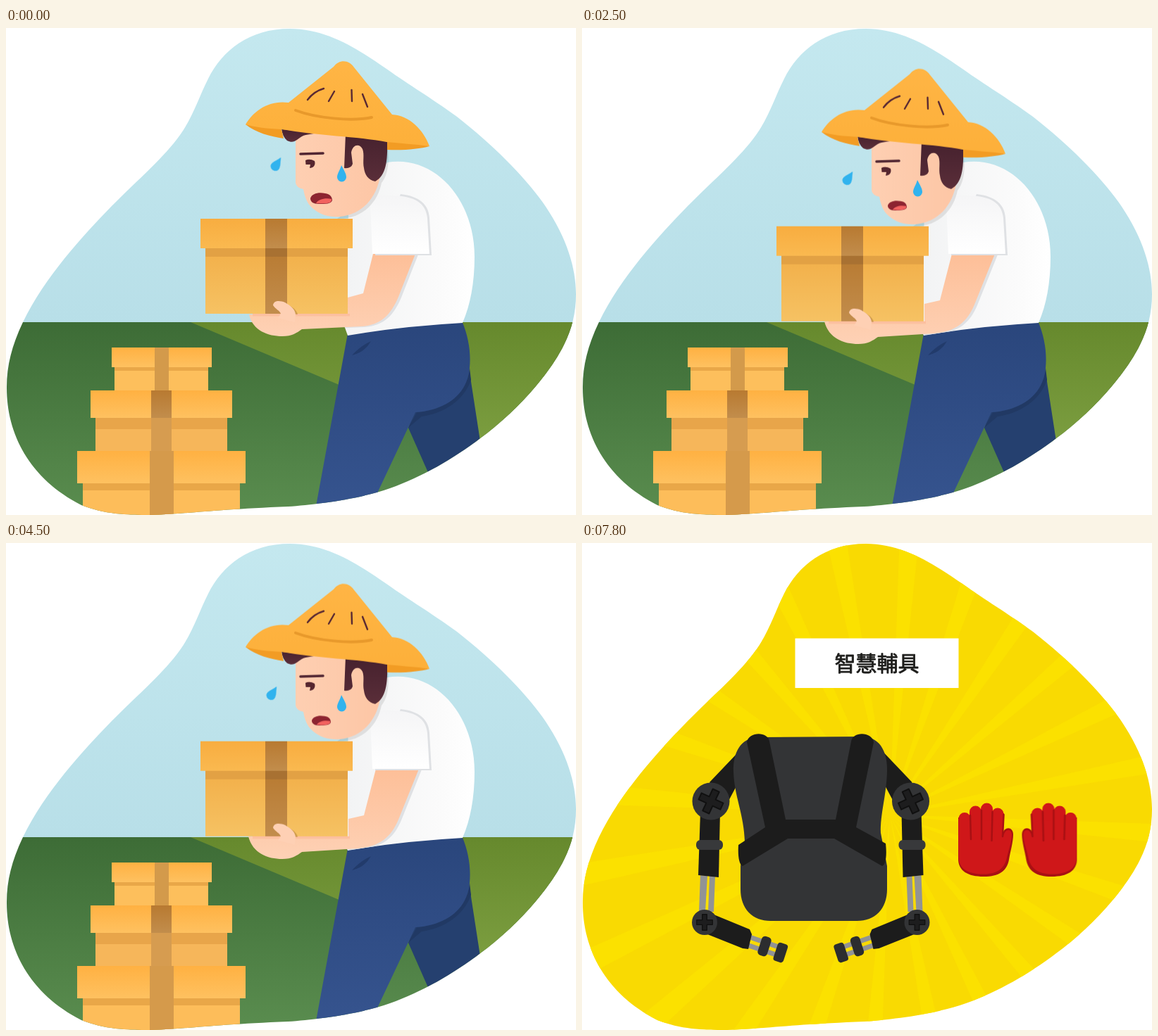
These frames come from a looping animation (809 by 692 pixels, 8000 ms). An HTML page:

```html
<!DOCTYPE html>
<html lang="zh-Hant">
<head>
<meta charset="utf-8">
<title>Smart aids</title>
<style>
html, body { margin: 0; width: 100%; height: 100%; overflow: hidden; background: #fff; }
svg { display: block; width: 100vw; height: 100vh; }

.work { animation: work 8s step-end infinite; }
.gear { animation: gear 8s step-end infinite; }
@keyframes work { 0% { visibility: visible; } 62.5%, 100% { visibility: hidden; } }
@keyframes gear { 0% { visibility: hidden; } 62.5%, 100% { visibility: visible; } }

/* lifting: up for half a second, down for half a second */
.sink, .fly, .drip, .mouth { animation: sink 1s step-end infinite; }
.fly { animation-name: fly; }
.drip { animation-name: drip; }
.mouth { animation-name: mouth; transform-origin: 447.5px 242.5px; }
.up { animation: up 1s step-end infinite; }
.down { animation: down 1s step-end infinite; }
@keyframes sink { 50%, 100% { transform: translateY(10.7px); } }
@keyframes fly { 50%, 100% { transform: translate(-6px, 20px); } }
@keyframes drip { 50%, 100% { transform: translateY(21px); } }
@keyframes mouth { 50%, 100% { transform: translateY(10.2px) scale(.87); } }
@keyframes up { 0% { opacity: 1; } 50%, 100% { opacity: 0; } }
@keyframes down { 0% { opacity: 0; } 50%, 100% { opacity: 1; } }

.rays { transform-origin: 437px 386px; animation: rays .4s -.2s step-end infinite; }
@keyframes rays { 0% { transform: rotate(2deg); } 50%, 100% { transform: rotate(9.5deg); } }

.label {
  font: 500 30px "Noto Sans CJK TC", "Noto Sans CJK", "Noto Sans CJK JP", sans-serif;
  text-anchor: middle; fill: #1d1d1b; stroke: #1d1d1b; stroke-width: .8; stroke-linejoin: round;
}
</style>
</head>
<body>
<svg viewBox="0 0 809 692" preserveAspectRatio="none">
<defs>
  <clipPath id="blob"><path d="M403 1C345 1 307 32 287 72C272 102 266 125 247 152C224 184 190 213 150 253C110 294 55 354 24 418C8 452 1 480 1 511C1 577 33 640 107 678C140 691 170 692 206 692C260 690 300 684 400 680C440 677 500 670 545 654C590 638 635 612 673 583C720 549 770 495 792 450C803 428 809 405 809 378C809 340 795 295 762 248C735 210 690 165 640 126C600 97 575 83 540 58C500 30 455 1 403 1Z"/></clipPath>
  <path id="torso" d="M541 191C610 180 665 245 665 325C665 362 659 394 648 419Q560 424 485 437L480 423L486 265L520 215Z"/>
  <clipPath id="onShirt"><use href="#torso"/></clipPath>
  <linearGradient id="sky" x2="0" y2="1"><stop stop-color="#c4e8ef"/><stop offset="1" stop-color="#b8dfe8"/></linearGradient>
  <linearGradient id="turf" x2="0" y2="1"><stop stop-color="#3d6c36"/><stop offset="1" stop-color="#5a8d4f"/></linearGradient>
  <linearGradient id="lawn" x2="0" y2="1"><stop stop-color="#66892d"/><stop offset="1" stop-color="#83a546"/></linearGradient>
  <linearGradient id="lid" x2="0" y2="1"><stop stop-color="#ffb142"/><stop offset="1" stop-color="#fec160"/></linearGradient>
  <linearGradient id="boxLid" x2="0" y2="1"><stop stop-color="#f8ad40"/><stop offset="1" stop-color="#fab950"/></linearGradient>
  <linearGradient id="boxBody" x2="0" y2="1"><stop stop-color="#f2af49"/><stop offset="1" stop-color="#f6c263"/></linearGradient>
  <linearGradient id="tape" x2="0" y2="1"><stop stop-color="#b87a31"/><stop offset="1" stop-color="#c28d4c"/></linearGradient>
  <linearGradient id="skin" x2="1" y2="0"><stop stop-color="#fecfb2"/><stop offset="1" stop-color="#fdc6a5"/></linearGradient>
  <linearGradient id="arm" x2="0" y2="1"><stop stop-color="#fdbf98"/><stop offset="1" stop-color="#fed1b5"/></linearGradient>
  <linearGradient id="shirt" x2="1" y2="0"><stop stop-color="#f2f3f4"/><stop offset=".75" stop-color="#fbfbfb"/><stop offset="1" stop-color="#fff"/></linearGradient>
  <linearGradient id="sleeve" x2="0" y2="1"><stop stop-color="#f5f5f6"/><stop offset="1" stop-color="#fff"/></linearGradient>
  <linearGradient id="jeans" x2="0" y2="1"><stop stop-color="#2a467c"/><stop offset="1" stop-color="#36548f"/></linearGradient>
  <linearGradient id="hair" x2="0" y2="1"><stop stop-color="#46212e"/><stop offset="1" stop-color="#5a2e39"/></linearGradient>
  <linearGradient id="hat" x2="0" y2="1"><stop stop-color="#ffb545"/><stop offset="1" stop-color="#fdb03a"/></linearGradient>
  <path id="armUp" d="M521 321L507 377L485 383V407H345C350 430 372 438 392 438C406 438 413 433 420 428L505 424C532 422 546 408 557 382L581 321Z"/>
  <path id="armDown" d="M525 321L508 387L486 392V417H344C350 441 372 449 392 449C406 449 413 444 420 439L500 434C530 431 546 419 557 393L586 321Z"/>
  <path id="drop" d="M0-12C4-4 7 0 7 5A6.5 6.5 0 0 1-6 5C-6 0-2-5 0-12Z" fill="#31b3ee"/>
  <path id="plus" d="M-5-17H5V-5H17V5H5V17H-5V5H-17V-5H-5Z" stroke-linejoin="round" stroke-width="2" stroke="#101010" fill="#1d1d1e"/>
  <g id="limb">
    <path d="M240 278L181 340L205 372L222 340L245 320Z" fill="#1c1c1c"/>
    <path d="M168 472L178 473L175 524H166ZM181 473H189L187 524H179Z" fill="#929394"/>
    <path d="M168 382H196L194 475L165 472Z" fill="#1c1c1c"/>
    <rect x="162" y="422" width="38" height="14" rx="6" fill="#38393b"/>
    <circle cx="183" cy="367" r="26.5" fill="#333436"/>
    <use href="#plus" transform="translate(183 367) rotate(25)"/>
    <path d="M238 560L282 575M234 571L278 586" stroke="#929394" stroke-width="7"/>
    <path d="M187 528L238 549L241 556L236 577L228 576L178 556Z" fill="#1c1c1c"/>
    <g fill="#2c2d2f" transform="rotate(18 259 573)">
      <rect x="252" y="559" width="14" height="28" rx="5"/>
      <rect x="276" y="561" width="15" height="27" rx="4"/>
    </g>
    <circle cx="174" cy="539" r="18" fill="#333436"/>
    <use href="#plus" transform="translate(174 539) scale(.66)"/>
  </g>
  <g id="glove">
    <path d="M534 390V449C534 466 548 474 570 474C592 474 603 466 606 450C608 438 612 425 612 414C612 403 599 402 597 414L599 384Z" fill="#a81013"/>
    <g stroke="#cf1719" stroke-width="17" stroke-linecap="round">
      <path d="M543 391.5V435M558.5 382V435M574.5 378V435M590 385L588 435"/>
    </g>
    <path d="M534.5 392V447C535 463 548 470.500 570 470.500C590 470.500 600 462 603 447C606 434 610 424 610 414C609 405 600 406 598 417L590 395Z" fill="#cf1719"/>
    <path d="M551 387L552 421M567 380V421M582.5 382L581.5 423M598.5 386L597 417" fill="none" stroke="#a81013" stroke-width="2.5" stroke-linecap="round"/>
  </g>
</defs>

<g class="work" clip-path="url(#blob)">
  <rect width="809" height="418" fill="url(#sky)"/>
  <rect y="418" width="809" height="274" fill="url(#turf)"/>
  <path d="M262 418H809V649Z" fill="url(#lawn)"/>

  <!-- stacked boxes -->
  <g>
    <rect x="154" y="482" width="133" height="33" fill="#fdbf5c"/>
    <rect x="154" y="482" width="133" height="5" fill="#e9a748"/>
    <rect x="150" y="454" width="142" height="28" fill="url(#lid)"/>
    <path d="M211 454H231V515H211Z" fill="#d39a4b"/>
    <rect x="127" y="554" width="187" height="47" fill="#f6b65a"/>
    <rect x="127" y="554" width="187" height="16" fill="#e8a54a"/>
    <rect x="120" y="515" width="201" height="39" fill="url(#lid)"/>
    <rect x="206" y="515" width="29" height="39" fill="url(#tape)"/>
    <rect x="206" y="554" width="29" height="47" fill="#d69c50"/>
    <rect x="109" y="647" width="223" height="45" fill="#fdbd5a"/>
    <rect x="109" y="647" width="223" height="10" fill="#e9a748"/>
    <rect x="101" y="601" width="239" height="46" fill="url(#lid)"/>
    <rect x="204" y="601" width="34" height="91" fill="#d59a4b"/>
  </g>

  <!-- legs and shirt -->
  <path d="M655 470L675 600L605 645L571 568L580 540Z" fill="#25406f"/>
  <path d="M571 568L583 546C625 543 655 520 658 483L660 500C650 530 620 548 590 552Z" fill="#213964"/>
  <path d="M485 434L647 416C657 440 660 462 658 483C655 520 625 543 581 546L525 665L438 690Z" fill="url(#jeans)"/>
  <path d="M518 445Q509 461 491 465Q503 452 518 445Z" fill="#223b6b"/>
  <use href="#torso" fill="url(#shirt)"/>

  <!-- arm -->
  <g class="up">
    <g clip-path="url(#onShirt)"><use href="#armUp" x="4" y="1" fill="#dfe1e4"/></g>
    <use href="#armUp" fill="url(#arm)"/>
  </g>
  <g class="down">
    <g clip-path="url(#onShirt)"><use href="#armDown" x="4" y="1" fill="#dfe1e4"/></g>
    <use href="#armDown" fill="url(#arm)"/>
  </g>
  <path d="M560 236C587 239 600 251 601 270L604 323H524V318Z" fill="#dfe1e4"/>
  <path d="M492 238H545C582 238 596 250 598 270L601 321H520L517 250Z" fill="url(#sleeve)"/>

  <!-- carried box -->
  <g class="sink">
    <rect x="350" y="406" width="138" height="3.5" fill="#fcbf9f"/>
    <rect x="283" y="313" width="202" height="93" fill="url(#boxBody)"/>
    <rect x="283" y="313" width="202" height="12" fill="#e2a144"/>
    <rect x="368" y="313" width="31" height="93" fill="url(#tape)"/>
    <rect x="368" y="313" width="31" height="12" fill="#a87132"/>
    <rect x="276" y="271" width="216" height="42" fill="url(#boxLid)"/>
    <rect x="368" y="271" width="31" height="42" fill="url(#tape)"/>
    <path d="M390 390C402 392 413 400 414 407H395Z" fill="#b8863f" opacity=".6"/>
    <path d="M379 394C380 387 388 387 396 390C405 395 410 400 411 407L410 418L386 412L390 406C388 401 383 400 379 394Z" fill="#fed0b4"/>
  </g>

  <!-- head -->
  <g class="sink">
    <path d="M541 160C546 195 540 212 533 220C528 246 508 272 470 271L500 250L530 200Z" fill="#000" opacity=".09"/>
    <path d="M411 142V190L411 220Q412 227 422 229C424 240 427 249 435 256C446 266 460 269 474 268C505 265 526 242 531 210L535 150Z" fill="url(#skin)"/>
    <path d="M391 142Q392 154 399 160C409 165 413 158 420 154C427 150 435 152 443 148L440 140Z" fill="url(#hair)"/>
    <path d="M482 150L541 160C542 190 539 210 524 218C514 216 509 208 508 199C506 190 509 180 506 172C502 164 492 165 490 177L492 193Q490 200 480 199Z" fill="url(#hair)"/>
    <path d="M418 179L450 178" stroke="#512632" stroke-width="3.6" stroke-linecap="round"/>
    <path d="M425 188Q431 185 438 189C440 195 436 199 431 199L432 194L425.500 194Z" fill="#56262f"/>
    <path d="M340 137C355 149 375 154 394 157L391 144L541 160V173C565 174 587 172 601 168L560 155L400 136Z" fill="#f29c24"/>
    <path d="M340 137C351 118 373 102 401 106L465 55C473 44 487 45 494 56L548 123C572 124 593 145 601 168C580 165 560 164 540 162C500 154 440 153 392 144C370 143 355 141 340 137Z" fill="url(#hat)"/>
    <path d="M411 117C440 128 490 133 519 127" fill="none" stroke="#e8992b" stroke-width="4" stroke-linecap="round"/>
    <path d="M428 102Q437 90 451 86M466 90L458 104M490.5 88L491 104M506 94L513 112" fill="none" stroke="#5a2a33" stroke-width="2.4" stroke-linecap="round"/>
  </g>
  <g class="mouth">
    <path d="M432 242C434 235 444 233 453 235C460 236 463 240 463 245C461 250 454 250 444 250C436 250 432 247 432 242Z" fill="#8d2430"/>
    <path d="M440 249C443 243 454 241 462 243C463 249 456 250 440 249Z" fill="#f2625f"/>
  </g>
  <g class="drip"><use href="#drop" transform="translate(476 207)"/></g>
  <g class="fly"><use href="#drop" transform="translate(384 193) rotate(34) scale(1 .92)"/></g>
</g>

<g class="gear" clip-path="url(#blob)">
  <rect width="809" height="692" fill="#f9da02"/>
  <circle class="rays" cx="437" cy="386" r="400" fill="none" stroke="#fbe100" stroke-width="800" pathLength="360" stroke-dasharray="4 11"/>

  <use href="#limb"/>
  <use href="#limb" transform="matrix(-1 0 0 1 649.5 0)"/>
  <path d="M250 276L400 275C425 277 434 300 433 325C432 360 423 385 424 412L433 459V492C433 520 416 537 390 537H268C242 537 225 520 225 492V459L231 425C230 385 216 360 215 325C214 298 225 277 250 276Z" fill="#333436"/>
  <path d="M234 283C236 268 264 267 266 282L289 393H360L382 282C384 267 412 268 414 283L389 404L431 427C433 445 431 458 426 459L358 420H292L228 459C223 457 221 445 222 429L260 404Z" fill="#1c1c1c"/>

  <use href="#glove"/>
  <use href="#glove" transform="matrix(-1 0 0 1 1236.5 0)"/>

  <rect x="302.5" y="135.5" width="232" height="70.5" fill="#fff"/>
  <text class="label" x="418.5" y="182">智慧輔具</text>
</g>
</svg>
</body>
</html>
```
